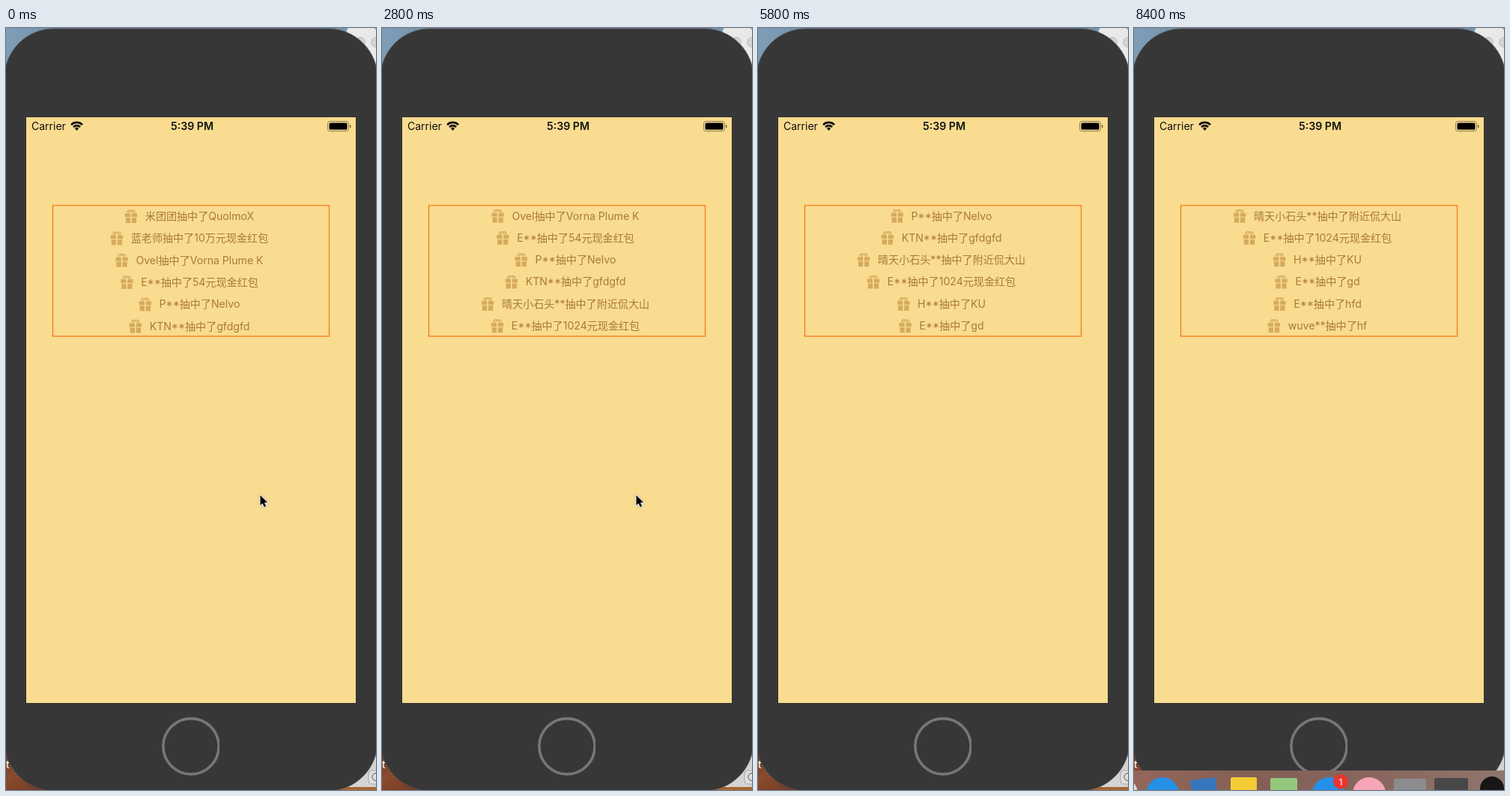
Recreate the animation shown at these times as an HTML page with a canvas. Size 494 by 1016 pixels, loop 8.5 s.

```html
<!DOCTYPE html>
<html lang="zh">
<head>
<meta charset="utf-8">
<title>Prize list</title>
<style>
  html, body { margin: 0; width: 100%; height: 100%; overflow: hidden; background: #373737; }
  canvas { display: block; width: 494px; height: 1016px; }
</style>
</head>
<body>
<canvas id="stage"></canvas>
<script>
const W = 494, H = 1016, LOOP = 8500, STEP = 100;
const FONT = 'Inter, "Noto Sans CJK SC", "Noto Sans CJK", sans-serif';
const ROW = 29.33, FIRST = 597, PERIOD = 1348, MOVE = 350;
const ROWS = [
  ['米团团', 'QuolmoX'], ['蓝老师', '10万元现金红包'], ['Ovel', 'Vorna Plume K'],
  ['E**', '54元现金红包'], ['P**', 'Nelvo'], ['KTN**', 'gfdgfd'],
  ['晴天小石头**', '附近侃大山'], ['E**', '1024元现金红包'], ['H**', 'KU'],
  ['E**', 'gd'], ['E**', 'hfd'], ['wuve**', 'hf']
].map(([who, prize]) => who + '抽中了' + prize);

const canvas = document.getElementById('stage');
const ctx = canvas.getContext('2d');
const dpr = window.devicePixelRatio || 1;
canvas.width = W * dpr;
canvas.height = H * dpr;
ctx.scale(dpr, dpr);

const clamp = v => Math.max(0, Math.min(1, v));
const ease = v => { v = clamp(v); return v * v * (3 - 2 * v); };

function rect(x, y, w, h, fill, r = 0) {
  ctx.fillStyle = fill;
  ctx.beginPath();
  ctx.roundRect(x, y, w, h, r);
  ctx.fill();
}

function disc(x, y, r, fill) {
  ctx.fillStyle = fill;
  ctx.beginPath();
  ctx.arc(x, y, r, 0, 7);
  ctx.fill();
}

function ring(x, y, r, color, width) {
  ctx.strokeStyle = color;
  ctx.lineWidth = width;
  ctx.beginPath();
  ctx.arc(x, y, r, 0, 7);
  ctx.stroke();
}

function text(s, x, y, color, font, align = 'left') {
  ctx.font = font + ' ' + FONT;
  ctx.fillStyle = color;
  ctx.textAlign = align;
  ctx.fillText(s, x, y);
}

function blend(x0, y0, x1, y1, ...colors) {
  const g = ctx.createLinearGradient(x0, y0, x1, y1);
  colors.forEach((c, i) => g.addColorStop(i / (colors.length - 1), c));
  return g;
}

function clipTo(x, y, w, h, draw) {
  ctx.save();
  ctx.beginPath();
  ctx.rect(x, y, w, h);
  ctx.clip();
  draw();
  ctx.restore();
}

function desktop() {
  rect(0, 0, W, 90, blend(0, 0, 60, 20, '#7f9db8', '#7593ab'));
  rect(455, 0, 39, 90, '#e9e9e9', 4);
  for (const x of [473, 494]) {
    disc(x, 19, 6.5, '#d2d2d2');
    ring(x, 19, 6.5, '#bdbdbd', 1);
  }
  rect(0, 930, 250, 86, blend(0, 960, 40, 1016, '#5f3a2c', '#8a4a2c', '#743d25'));
  text('t', 0, 987, '#fff', '500 13px');
  rect(250, 930, 244, 86, '#a8652f');
  rect(430, 930, 64, 82, '#d4d4d4');
  rect(484, 990, 20, 18, '#dedede', 4);
  ctx.strokeStyle = '#aaa';
  ctx.lineWidth = 1;
  ctx.stroke();
  ring(494, 998.5, 5, '#555', 1);
}

function phone() {
  rect(-2, 1, 498, 1016, '#373737', 66);
  ctx.strokeStyle = '#4c4f51';
  ctx.lineWidth = 1;
  ctx.stroke();
  rect(26.5, 118.5, 441, 782, '#2a2a2a');
  rect(27, 119, 440, 781, '#f9dc90');
  clipTo(207, 919, 78, 79, () => ring(247, 957.8, 37.1, '#777', 3.6));
}

function statusBar() {
  text('Carrier', 34, 136, '#111', '400 14px');
  text('5:39 PM', 248.5, 136, '#111', '600 14.2px', 'center');
  ctx.strokeStyle = '#111';
  ctx.lineWidth = 2.6;
  for (const r of [6.4, 10.6]) {
    ctx.beginPath();
    ctx.arc(94.5, 136.5, r, -Math.PI * .75, -Math.PI * .25);
    ctx.stroke();
  }
  ctx.fillStyle = '#111';
  ctx.beginPath();
  ctx.moveTo(94.5, 137);
  ctx.arc(94.5, 136.5, 3.8, -Math.PI * .75, -Math.PI * .25);
  ctx.fill();
  ctx.strokeStyle = '#8d7d55';
  ctx.lineWidth = 1;
  ctx.beginPath();
  ctx.roundRect(429.5, 124.5, 28, 13, 3);
  ctx.stroke();
  rect(431.5, 126.5, 24, 9, '#000', 1.5);
  rect(459, 129, 1.5, 4, '#6f6344', 1);
}

function gift(x, y) {
  const c = '#d6ab5d';
  for (const s of [0, 1]) {
    rect(x + s * 9, y - 4, 7.3, 5, c);
    rect(x + 1 + s * 8, y + 2, 6.3, 7, c);
  }
  ctx.strokeStyle = c;
  ctx.lineWidth = 1.3;
  for (const s of [-1, 1]) {
    ctx.beginPath();
    ctx.ellipse(x + 8.15 + s * 2.8, y - 6.8, 2.3, 1.2, s * .35, 0, 7);
    ctx.stroke();
  }
}

function prizeList(t) {
  let pos = 0;
  for (let k = 0; k < 6; k++) pos += ease((t - FIRST - k * PERIOD) / MOVE);
  const shift = pos * ROW + .5 * Math.min(1, pos);
  clipTo(63, 237, 368, 174, () => {
    ROWS.forEach((s, i) => {
      const y = 251 + i * ROW - shift;
      if (y < 220 || y > 430) return;
      ctx.font = '400 14.08px ' + FONT;
      const x = 245 - (ctx.measureText(s).width + 27) / 2;
      gift(x, y);
      text(s, x + 27, y + 5, '#aa7a32', '400 14.08px');
    });
  });
  ctx.strokeStyle = '#f5841f';
  ctx.lineWidth = 1.4;
  ctx.strokeRect(62.5, 236.6, 369, 174.4);
}

function pointer(t) {
  const gone = ease((t - 4200) / 600);
  if (gone === 1) return;
  ctx.save();
  ctx.translate(339.5 + 98 * gone, 623 + 400 * gone);
  ctx.beginPath();
  [[0, 0], [0, 13.5], [3, 10.7], [5.2, 15.8], [7.7, 14.8], [5.5, 9.8], [9.7, 9.6]]
    .forEach(p => ctx.lineTo(...p));
  ctx.closePath();
  ctx.lineJoin = 'round';
  ctx.strokeStyle = '#fff';
  ctx.lineWidth = 2;
  ctx.shadowColor = 'rgba(0,0,0,.3)';
  ctx.shadowBlur = 2;
  ctx.stroke();
  ctx.shadowColor = 'transparent';
  ctx.fillStyle = '#000';
  ctx.fill();
  ctx.restore();
}

function dock(t) {
  const up = ease((t - 7150) / 300);
  if (!up) return;
  ctx.save();
  ctx.translate(0, 26 * (1 - up));
  rect(0, 990, W, 60, blend(0, 0, W, 0, '#94665a', '#835f55', '#88675f', '#8f766e'));
  disc(-17, 1021, 22, '#dcdcdc');
  disc(38, 1021, 22, '#2590e6');
  ctx.save();
  ctx.translate(94, 1019);
  ctx.rotate(-.13);
  rect(-17, -18, 34, 40, '#3676bd');
  ctx.restore();
  rect(129, 999, 35, 40, '#f4cb35', 2);
  rect(182, 1000, 36, 40, '#93c87d', 2);
  disc(260, 1021, 22, '#258fe9');
  disc(314, 1021, 22, '#f5a5b7');
  rect(347, 1001, 43, 40, '#8c8c8e', 2);
  rect(401, 1000, 45, 40, '#484848', 3);
  disc(478, 1014, 16, '#161616');
  disc(276, 1005, 10, '#e8352e');
  text('1', 276, 1009.5, '#fff', '400 12px', 'center');
  ctx.restore();
}

function frame(now) {
  const t = Math.floor((now % LOOP) / STEP) * STEP;
  ctx.clearRect(0, 0, W, H);
  desktop();
  phone();
  statusBar();
  prizeList(t);
  pointer(t);
  dock(t);
}

let start;
function tick(now) {
  start ??= now;
  frame(now - start);
  requestAnimationFrame(tick);
}
requestAnimationFrame(tick);
</script>
</body>
</html>
```
